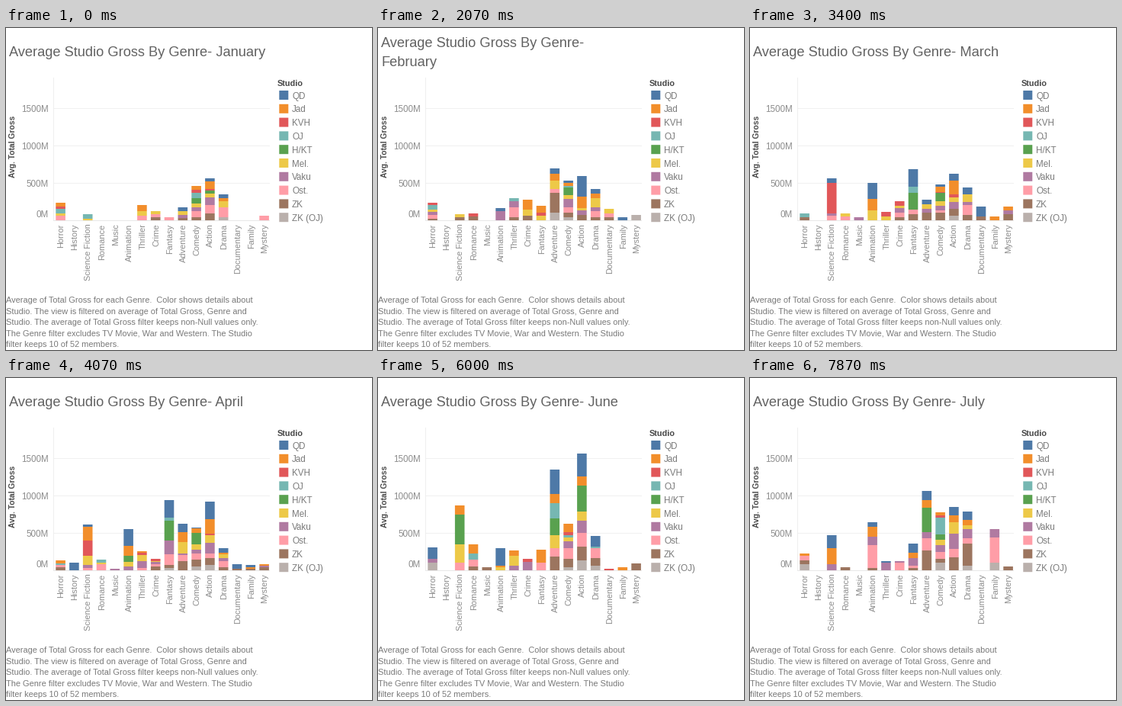
Animation, 480 px wide and 422 px high, one loop 8000 ms. Source, as a matplotlib script:

```python
import matplotlib.pyplot as plt
from matplotlib.animation import FuncAnimation
from matplotlib.patches import Rectangle

W, H, DPI = 480, 422, 100
BASE, PITCH, BAR = 252, 17.8, 12.6
INTERVAL, FRAMES, HOLD = 200, 40, 6
DARK, MID, LIGHT = "#484848", "#7a7a7a", "#8c8c8c"

# Stacking order, top to bottom: colour key -> (hex, label)
STUDIOS = {
    "blue": ("#4e79a7", "QD"),
    "orange": ("#f28e2b", "Jad"),
    "red": ("#e15759", "KVH"),
    "teal": ("#76b7b2", "OJ"),
    "green": ("#59a14f", "H/KT"),
    "yellow": ("#edc948", "Mel."),
    "purple": ("#b07aa1", "Vaku"),
    "pink": ("#ff9da7", "Ost."),
    "brown": ("#9c755f", "ZK"),
    "gray": ("#bab0ac", "ZK (OJ)"),
}

GENRES = ["Horror", "History", "Science Fiction", "Romance", "Music",
          "Animation", "Thriller", "Crime", "Fantasy", "Adventure", "Comedy",
          "Action", "Drama", "Documentary", "Family", "Mystery"]

CAPTION = [
    "Average of Total Gross for each Genre.  Color shows details about",
    "Studio. The view is filtered on average of Total Gross, Genre and",
    "Studio. The average of Total Gross filter keeps non-Null values only.",
    "The Genre filter excludes TV Movie, War and Western. The Studio",
    "filter keeps 10 of 52 members.",
]

# Segment heights in pixels (49 px = 500M)
january = {
    "Horror": dict(orange=5, red=3, teal=6, yellow=3, pink=6),
    "Science Fiction": dict(teal=6, yellow=2),
    "Thriller": dict(orange=8, yellow=6, pink=6),
    "Crime": dict(yellow=4, pink=4, brown=4),
    "Fantasy": dict(pink=4),
    "Adventure": dict(blue=5, yellow=5, purple=4, brown=3),
    "Comedy": dict(orange=5, red=4, teal=7, green=7, yellow=5, purple=5,
                   pink=8, brown=4),
    "Action": dict(blue=4, orange=10, red=2, green=4, yellow=5, purple=10,
                   pink=11, brown=9),
    "Drama": dict(blue=5, orange=4, yellow=8, pink=13, gray=4),
    "Mystery": dict(pink=6),
}
february = {
    "Horror": dict(red=3, teal=6, yellow=3, purple=4, pink=5, brown=2),
    "Science Fiction": dict(yellow=4, brown=4),
    "Romance": dict(red=4, brown=5),
    "Animation": dict(blue=4, purple=12),
    "Thriller": dict(teal=4, purple=8, pink=13, brown=4),
    "Crime": dict(orange=13, yellow=8, brown=6),
    "Fantasy": dict(orange=9, red=4, yellow=6),
    "Adventure": dict(blue=7, orange=9, yellow=11, pink=5, brown=26, gray=10),
    "Comedy": dict(blue=3, orange=4, teal=2, green=10, yellow=5, purple=11,
                   pink=7, brown=6, gray=4),
    "Action": dict(blue=27, orange=15, yellow=3, purple=6, brown=7),
    "Drama": dict(blue=6, orange=6, yellow=12, purple=5, pink=8, brown=4),
    "Documentary": dict(yellow=6, pink=5, brown=4),
    "Family": dict(blue=4),
    "Mystery": dict(gray=7),
}
march = {
    "Horror": dict(teal=5, brown=4),
    "Science Fiction": dict(blue=6, red=40, purple=3, pink=6),
    "Romance": dict(yellow=4, pink=5),
    "Music": dict(purple=4),
    "Animation": dict(blue=21, orange=15, yellow=13),
    "Thriller": dict(red=6, yellow=5),
    "Crime": dict(red=6, yellow=3, purple=6, pink=6, brown=4),
    "Fantasy": dict(blue=23, teal=8, green=22, pink=6, brown=8),
    "Adventure": dict(blue=6, yellow=6, purple=5, brown=10),
    "Comedy": dict(blue=3, orange=7, red=1, green=11, yellow=6, purple=6,
                   pink=3, brown=10),
    "Action": dict(blue=9, orange=18, red=4, yellow=6, purple=9, brown=9,
                   gray=6),
    "Drama": dict(blue=9, yellow=10, purple=4, pink=13, brown=7),
    "Documentary": dict(blue=13, brown=5),
    "Family": dict(orange=5),
    "Mystery": dict(orange=5, purple=5, brown=8),
}
may = {
    "Horror": dict(orange=8, pink=7, brown=4),
    "History": dict(blue=20),
    "Science Fiction": dict(orange=37, yellow=25, purple=6),
    "Romance": dict(teal=8, pink=12),
    "Animation": dict(blue=24, orange=11, green=16, purple=11),
    "Thriller": dict(orange=4, yellow=12, purple=18, pink=6),
    "Crime": dict(brown=6),
    "Fantasy": dict(blue=24, green=31, purple=37, pink=23, gray=6),
    "Adventure": dict(blue=17, orange=26, yellow=24, pink=17, brown=15),
    "Comedy": dict(orange=6, green=20, yellow=8, purple=5, pink=13, brown=8,
                   gray=10),
    "Action": dict(blue=37, orange=21, yellow=15, purple=20, pink=12, brown=9,
                   gray=9),
    "Drama": dict(blue=3, orange=5, purple=4, pink=4, brown=2),
    "Family": dict(blue=6, brown=4),
}
june = {
    "Horror": dict(blue=15, purple=5, gray=10),
    "Science Fiction": dict(orange=12, green=39, yellow=24, pink=10),
    "Romance": dict(orange=12, teal=8, pink=9, brown=5),
    "Music": dict(brown=4),
    "Animation": dict(blue=23, orange=2, yellow=4),
    "Thriller": dict(orange=7, yellow=13, purple=6),
    "Crime": dict(red=4, purple=11),
    "Fantasy": dict(orange=17, pink=10),
    "Adventure": dict(blue=32, orange=12, teal=20, green=22, yellow=17,
                      pink=11, brown=18),
    "Comedy": dict(orange=11, red=4, teal=3, yellow=5, purple=9, pink=14,
                   brown=11, gray=4),
    "Action": dict(blue=30, orange=12, green=34, yellow=12, purple=16, pink=18,
                   brown=18, gray=13),
    "Drama": dict(blue=14, teal=2, pink=13, brown=10, gray=6),
    "Documentary": dict(red=2),
    "Family": dict(orange=4),
    "Mystery": dict(brown=9),
}
july = {
    "Horror": dict(orange=3, pink=6, brown=5, gray=8),
    "Science Fiction": dict(blue=17, orange=21, purple=8),
    "Romance": dict(brown=4),
    "Animation": dict(blue=6, orange=13, purple=11, pink=30, brown=3),
    "Thriller": dict(blue=2, purple=10),
    "Crime": dict(purple=2, pink=10),
    "Fantasy": dict(blue=12, orange=7, purple=10, pink=3, brown=3),
    "Adventure": dict(blue=12, orange=10, green=32, purple=8, pink=16,
                      brown=26),
    "Comedy": dict(orange=4, red=3, teal=22, green=7, yellow=7, purple=9,
                   pink=9, brown=5, gray=10),
    "Action": dict(blue=11, orange=9, yellow=15, purple=20, pink=11, brown=17),
    "Drama": dict(blue=11, orange=7, yellow=5, purple=12, pink=7, brown=29,
                  gray=6),
    "Family": dict(purple=11, pink=33, gray=10),
    "Mystery": dict(brown=5),
}


def blend(a, b):
    """Mean of two months, in whole pixels."""
    return {g: {s: (a.get(g, {}).get(s, 0) + b.get(g, {}).get(s, 0)) // 2
                for s in STUDIOS} for g in GENRES}


MONTHS = {"January": january, "February": february, "March": march,
          "April": blend(march, may), "May": may, "June": june, "July": july}

plt.rcParams["font.family"] = "Liberation Sans"
fig = plt.figure(figsize=(W / DPI, H / DPI), dpi=DPI, facecolor="white")
ax = fig.add_axes([0, 0, 1, 1])
ax.set_xlim(0, W)
ax.set_ylim(H, 0)
ax.axis("off")


def text(x, y, s, px, color=MID, **kw):
    return ax.text(x, y, s, fontsize=px * 72 / DPI, color=color,
                   va="baseline", rotation_mode="anchor", **kw)


def box(x, y, w, h, color):
    return ax.add_patch(Rectangle((x, y), w, h, fc=color, lw=0, snap=False))


def center(i):
    return 71.6 + PITCH * i


def draw_frame():
    for i in range(1, 4):
        box(62, BASE - 49 * i, 284, 1, "#f0f0f0")
        text(56, BASE - 49 * i + 5, f"{500 * i}M", 11.6, LIGHT, ha="right")
    text(56, 248, "0M", 11.6, LIGHT, ha="right")
    box(62, 65, 1, 187, "#eeeeee")
    box(62, BASE, 284, 1, "#e8e8e8")
    text(12, 155.8, "Avg. Total Gross", 10.3, DARK, ha="center", rotation=90,
         weight="bold")
    for i, genre in enumerate(GENRES):
        text(center(i) + 4, 256.5, genre, 11, LIGHT, ha="right", rotation=90)
    text(356, 76, "Studio", 10.9, DARK, weight="bold")
    for i, (color, name) in enumerate(STUDIOS.values()):
        y = 88 + PITCH * i
        box(358.3, y - 6, 12, 12, color)
        text(375, y + 4.5, name, 11.6)
    for i, line in enumerate(CAPTION):
        text(0, 360 + 14.6 * i, line, 11.05, MID)


def draw_month(month, data):
    head = "Average Studio Gross By Genre-"
    if len(month) > 7:
        lines = [(25, head), (50, month)]
    else:
        lines = [(37, f"{head} {month}")]
    parts = [text(4, y, s, 18.3, "#626262") for y, s in lines]
    for i, genre in enumerate(GENRES):
        y = BASE
        for key in reversed(STUDIOS):
            h = data.get(genre, {}).get(key, 0)
            if h:
                y -= h
                parts.append(box(center(i) - BAR / 2, y, BAR, h,
                                 STUDIOS[key][0]))
    return parts


draw_frame()
groups = [draw_month(m, d) for m, d in MONTHS.items()]


def update(frame):
    for k, group in enumerate(groups):
        for part in group:
            part.set_visible(k == frame // HOLD)
    return []


anim = FuncAnimation(fig, update, frames=FRAMES, interval=INTERVAL,
                     repeat=True, repeat_delay=0)
plt.show()
```
